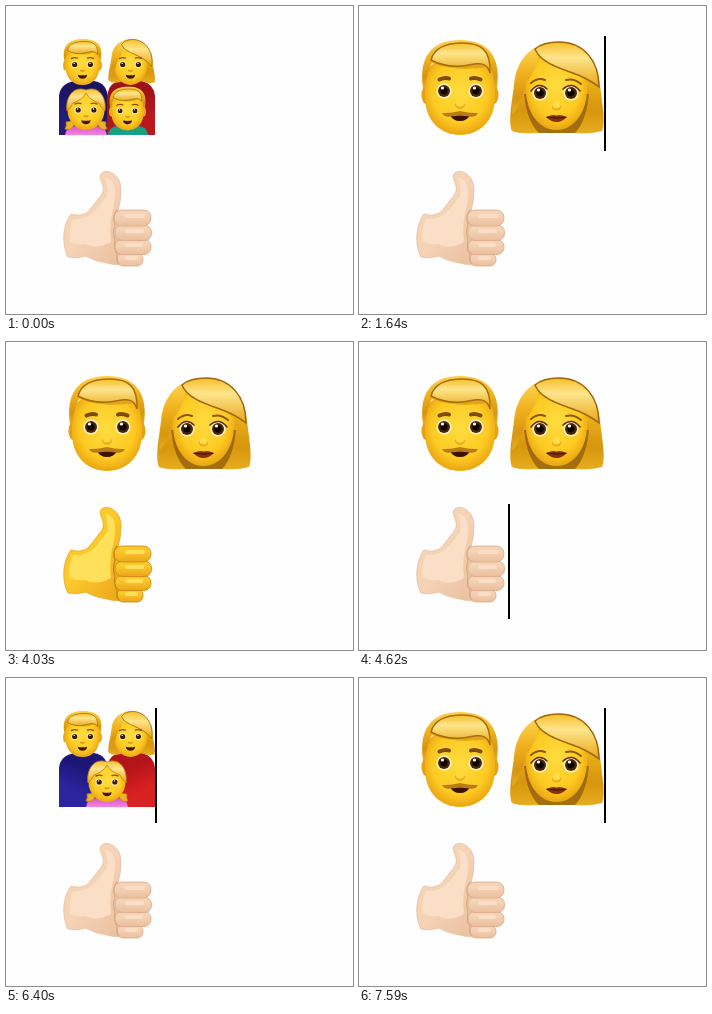
These frames come from a looping animation (347 by 308 pixels, 8000 ms). An HTML page:

```html
<!DOCTYPE html>
<html lang="en">
<head>
<meta charset="utf-8">
<title>Emoji backspace</title>
<style>
html, body { margin: 0; width: 100%; height: 100%; overflow: hidden; background: #fefefe; }
svg { display: block; width: 100vw; height: 100vh; }
:root {
  --hi: #fadfc6; --base: #f5d4b6; --low: #e9bf9e; --line: #dba988;
  --blue: #2d25a0; --navy: #1d1676; --red: #d92023; --wine: #b3141a;
}
:root.four { --blue: #241c78; --navy: #1a1460; --red: #b8181e; --wine: #9b1218; }
:root.yellow { --hi: #ffe05a; --base: #fcc92c; --low: #eba51a; --line: #c98512; }
.line { fill: none; stroke-linecap: round; stroke-linejoin: round; }
</style>
</head>
<body>
<svg viewBox="0 0 347 308">
<defs>
  <radialGradient id="skin" cx=".5" cy=".45" r=".6">
    <stop offset="0" stop-color="#ffdc40"/><stop offset=".65" stop-color="#fdca22"/><stop offset="1" stop-color="#e49c0e"/>
  </radialGradient>
  <linearGradient id="hair" x2="0" y2="1">
    <stop offset="0" stop-color="#ffd248"/><stop offset=".4" stop-color="#eeb01c"/><stop offset=".75" stop-color="#d6960e"/><stop offset="1" stop-color="#e8ac20"/>
  </linearGradient>
  <linearGradient id="fringe" x2="0" y2="1">
    <stop offset="0" stop-color="#f6bf2a"/><stop offset=".35" stop-color="#ffe58c"/><stop offset="1" stop-color="#e5a617"/>
  </linearGradient>
  <linearGradient id="pink" x2="0" y2="1">
    <stop offset="0" stop-color="#d955c4"/><stop offset="1" stop-color="#f583e6"/>
  </linearGradient>
  <linearGradient id="shirt" x1=".7" x2=".3" y2="1">
    <stop offset=".3" stop-color="var(--navy)"/><stop offset=".75" stop-color="var(--blue)"/>
  </linearGradient>
  <linearGradient id="dress" x1=".3" x2=".7" y2="1">
    <stop offset=".3" stop-color="var(--wine)"/><stop offset=".75" stop-color="var(--red)"/>
  </linearGradient>
  <linearGradient id="hand" x2="1" y2="1">
    <stop offset=".45" stop-color="var(--base)"/><stop offset="1" stop-color="var(--low)"/>
  </linearGradient>
  <linearGradient id="finger" x2="0" y2="1">
    <stop offset=".3" stop-color="var(--base)"/><stop offset="1" stop-color="var(--low)"/>
  </linearGradient>

  <g id="bigEye">
    <ellipse rx="7.600" ry="7.400" fill="#fff3cf"/>
    <circle r="6" fill="#4a2607"/><circle r="3.600" fill="#0b0502"/>
    <circle cx="-1.500" cy="-3" r="1.600" fill="#fff"/>
  </g>

  <!-- small faces are centred on 0,0 -->
  <g id="features">
    <g id="eye">
      <ellipse cx="-8" cy="2" rx="3.500" ry="3.400" fill="#ffefbc"/>
      <circle cx="-7.800" cy="2" r="2.600" fill="#371b05"/><circle cx="-8.300" cy=".9" r=".7" fill="#fff"/>
    </g>
    <use href="#eye" x="15.700"/>
    <path class="line" stroke="#8f560b" stroke-width="1.400" d="M-11-4q3-1.500 6-.4M5-4.400q3-1.100 6 .4"/>
    <path class="line" stroke="#e29a10" stroke-width="1.700" d="M-1.700 8q1.700 1 3.400 0"/>
    <path fill="#451405" d="M-4.800 12.200q4.800 1 9.600 0q-.8 4-4.800 4t-4.800-4z"/>
  </g>

  <g id="boy">
    <g fill="#eaa817"><ellipse cx="-17" cy="3" rx="2.400" ry="5"/><ellipse cx="17" cy="3" rx="2.400" ry="5"/></g>
    <path fill="url(#skin)" d="M-17-7C-17-21 17-21 17-7V4C17 15 10 22.500 0 22.500S-17 15-17 4z"/>
    <path fill="url(#hair)" d="M-18-1C-21-16-15-23.500 1-23.500S21-15 18-1H17C17-6 16-9 14-11Q0-5-14-11C-16-8-17-5-17-1z"/>
    <path fill="url(#fringe)" stroke="#b5770f" stroke-width=".9" d="M-15-12C-14-19-6-21.500 4-21C12-20.500 16-16 15-8C12-12 8-11 4-10C-4-8-10-9-15-12z"/>
    <use href="#features"/>
  </g>

  <g id="girl">
    <g id="tail"><path fill="#eeb326" stroke="#b97c0e" stroke-width=".8" d="M-13 13L-20 14Q-19 18-21 21Q-15 23-12 17z"/></g>
    <use href="#tail" transform="scale(-1 1)"/>
    <ellipse cy="2" rx="18.500" ry="20" fill="url(#skin)"/>
    <path fill="url(#fringe)" stroke="#bd800f" stroke-width=".8" d="M0-18C-13-23-21-10-19 3Q-15 0-13-5Q-4-8 0-15Q4-8 13-5Q15 0 19 3C21-10 13-23 0-18z"/>
    <use href="#features"/>
  </g>

  <g id="mom">
    <path fill="url(#hair)" d="M-22 18C-23 12-20 4-19-6C-18-17-10-23.500 1-23.500C14-23.500 21-14 22-3C22 7 26 14 24 20Q18 22 13 19H-9Q-17 22-22 18z"/>
    <ellipse cy="3" rx="16.500" ry="19.500" fill="url(#skin)"/>
    <path fill="url(#hair)" d="M-8-18C-17-12-18 0-20 12C-15 8-14 0-12-4C-8-8-7-12-8-18z"/>
    <path fill="url(#fringe)" stroke="#ad720e" stroke-width=".9" d="M-9-18C-5-8 12-9 21 4C24-8 16-23 2-23C-3-23-7-21-9-18z"/>
    <use href="#features"/>
  </g>

  <g id="parents">
    <path fill="url(#shirt)" d="M53 129V90Q54 78 68 75H88Q102 77 102 94V129z"/>
    <path fill="url(#dress)" d="M149 129V90Q148 78 136 75H114Q101 77 101 94V129z"/>
    <use href="#boy" x="76.500" y="56.500"/>
    <use href="#mom" x="124.500" y="56.500"/>
  </g>
  <g id="daughter">
    <path fill="url(#pink)" d="M-21 27Q-20 18-9 18H9Q20 18 21 27z"/>
    <use href="#girl"/>
  </g>
</defs>

<g id="four">
  <use href="#parents"/>
  <use href="#daughter" x="80" y="102"/>
  <path fill="#16a184" d="M102 129Q103 120 113 120H131Q141 120 142 129z"/>
  <use href="#boy" transform="translate(121.500 103) scale(.95)"/>
</g>

<g id="three">
  <use href="#parents"/>
  <use href="#daughter" x="101" y="102"/>
</g>

<g id="couple">
  <g fill="#e5a013"><ellipse cx="67" cy="89" rx="4.500" ry="9"/><ellipse cx="135" cy="89" rx="4.500" ry="9"/></g>
  <path fill="url(#skin)" d="M66 72C66 44 136 44 136 72V91C136 114 121 129 101 129S66 114 66 91z"/>
  <path fill="url(#hair)" d="M64 82C60 54 70 34 101 34S142 54 138 82H135C135 72 134 65 130 61Q98 66 73 57C69 64 67 73 67 82z"/>
  <path fill="url(#fringe)" stroke="#a96d0c" stroke-width="1.500" d="M72 54C75 42 87 37 104 37C122 37 132 44 131 67C128 56 120 57 110 59C94 62 81 59 72 54z"/>
  <use href="#bigEye" x="85" y="85"/><use href="#bigEye" x="117" y="85"/>
  <path class="line" stroke="#7d4c0a" stroke-width="4" d="M80.500 73.500Q86 71 90 72.500M112 72.500Q116 71 121.500 73.500"/>
  <ellipse cx="101" cy="99" rx="5" ry="4" fill="#f0ad18"/><ellipse cx="101" cy="97" rx="4" ry="3.500" fill="#ffd93c"/>
  <path fill="#3d1206" d="M91 109H111Q108 115 101 115T91 109z"/>
  <path fill="#b97a12" d="M83 107Q92 107.500 101 105Q110 107.500 119 107Q117 111.500 110 110.500Q101 109 92 110.500Q85 111.500 83 107z"/>

  <path fill="url(#hair)" d="M153 125C149 116 153 95 155 79C157 52 175 35 200 36C225 37 239 54 241 79C243 96 247 116 243 125Q232 128 219 127H176Q160 128 153 125z"/>
  <path fill="#8f5a09" opacity=".75" d="M165 88Q168 116 180 127H216Q227 116 230 88z"/>
  <path fill="url(#skin)" d="M167 80C167 32 228 32 228 80C229 106 215 124 197.500 124S166 106 167 80z"/>
  <path fill="url(#hair)" d="M179 42C161 48 156 64 153 108C163 102 165 84 168 75C176 66 180 54 179 42z"/>
  <path fill="url(#fringe)" stroke="#a0660b" stroke-width="1.500" d="M176 43C182 58 204 63 219 69Q231 74 240 81C240 54 224 36 200 36Q184 36 176 43z"/>
  <use href="#bigEye" x="181" y="87"/><use href="#bigEye" x="212" y="87"/>
  <path class="line" stroke="#8f560a" stroke-width="2" d="M172 77Q179 71 186 74M207 74Q215 72 222 78"/>
  <path class="line" stroke="#5a2c06" stroke-width="1.500" d="M172 85Q180 75 188 83M204 83Q213 75 221 85"/>
  <ellipse cx="197.500" cy="101" rx="4.500" ry="3.500" fill="#f0ad18"/><ellipse cx="197.500" cy="99" rx="3.800" ry="3.200" fill="#ffdc48"/>
  <path fill="#85300f" d="M187 111Q194 108 197.500 109.500Q201 108 208 111Q203 116 197.500 116T187 111z"/>
  <path class="line" stroke="#4b1305" d="M188 111.300Q197.500 113 207 111.300"/>
</g>

<g id="thumb">
  <path fill="url(#hand)" stroke="var(--low)" stroke-width=".8" d="M65 208Q75 211 82 206Q90 196 96 188Q99 183 95 174C92 167 98 164 104 166C111 169 115 175 115 184Q115 195 112 205L118 257Q111 260 101 257Q88 255 80 250Q71 253 62 251C56 240 56 220 65 208z"/>
  <path fill="var(--hi)" d="M67 213Q80 214 88 206L101 190Q103 184 99 171Q109 174 109 185Q109 198 106 207Q103 223 105 236Q91 244 79 238Q70 239 64 236Q62 223 67 213z"/>
  <g fill="url(#finger)" stroke="var(--line)" stroke-width=".8">
    <rect x="111" y="247" width="26" height="13" rx="6"/>
    <rect x="109" y="233.500" width="36" height="15" rx="7"/>
    <rect x="109" y="219" width="36.500" height="15.500" rx="7"/>
    <rect x="108" y="204" width="37" height="16" rx="7.500"/>
  </g>
  <path class="line" stroke="var(--line)" stroke-width="1.200" d="M111 204Q106 210 109 219Q106 227 109 234Q107 242 111 248Q110 254 113 258"/>
  <path class="line" stroke="var(--hi)" stroke-width="4" d="M121 210H137M121 225H136M121 239H135M121 252H130"/>
</g>
<rect id="caret" width="2" height="115"/>
</svg>
<script>
const byId = id => document.getElementById(id);
const LOOP = 8000;

// Each track is a list of [start in ms, value].
const people = [[0, 'four'], [590, 'three'], [1640, 'couple'],
  [5360, 'four'], [6400, 'three'], [7590, 'couple']];
const tones = [[0, 'light'], [3580, 'yellow'], [4620, 'light']];
const spots = [[0, [149, 30]], [1640, [245, 30]], [2540, [149, 162]],
  [5360, [149, 30]], [7590, [245, 30]]];
const blink = [450, 1040, 1190, 2540, 2980, 3130, 3580, 4030, 4170,
  5060, 5210, 5810, 5950, 7450, 7590];

const at = (track, t) => track.findLast(([start]) => start <= t)[1];

function draw(now) {
  const t = now % LOOP;
  const shown = at(people, t), [x, y] = at(spots, t);
  for (const id of ['four', 'three', 'couple'])
    byId(id).style.display = id === shown ? '' : 'none';
  document.documentElement.className = shown + ' ' + at(tones, t);
  const caret = byId('caret');
  caret.setAttribute('x', x);
  caret.setAttribute('y', y);
  caret.setAttribute('opacity', blink.filter(b => b <= t).length % 2);
}

function tick() {
  draw(performance.now());
  requestAnimationFrame(tick);
}
tick();
</script>
</body>
</html>
```
